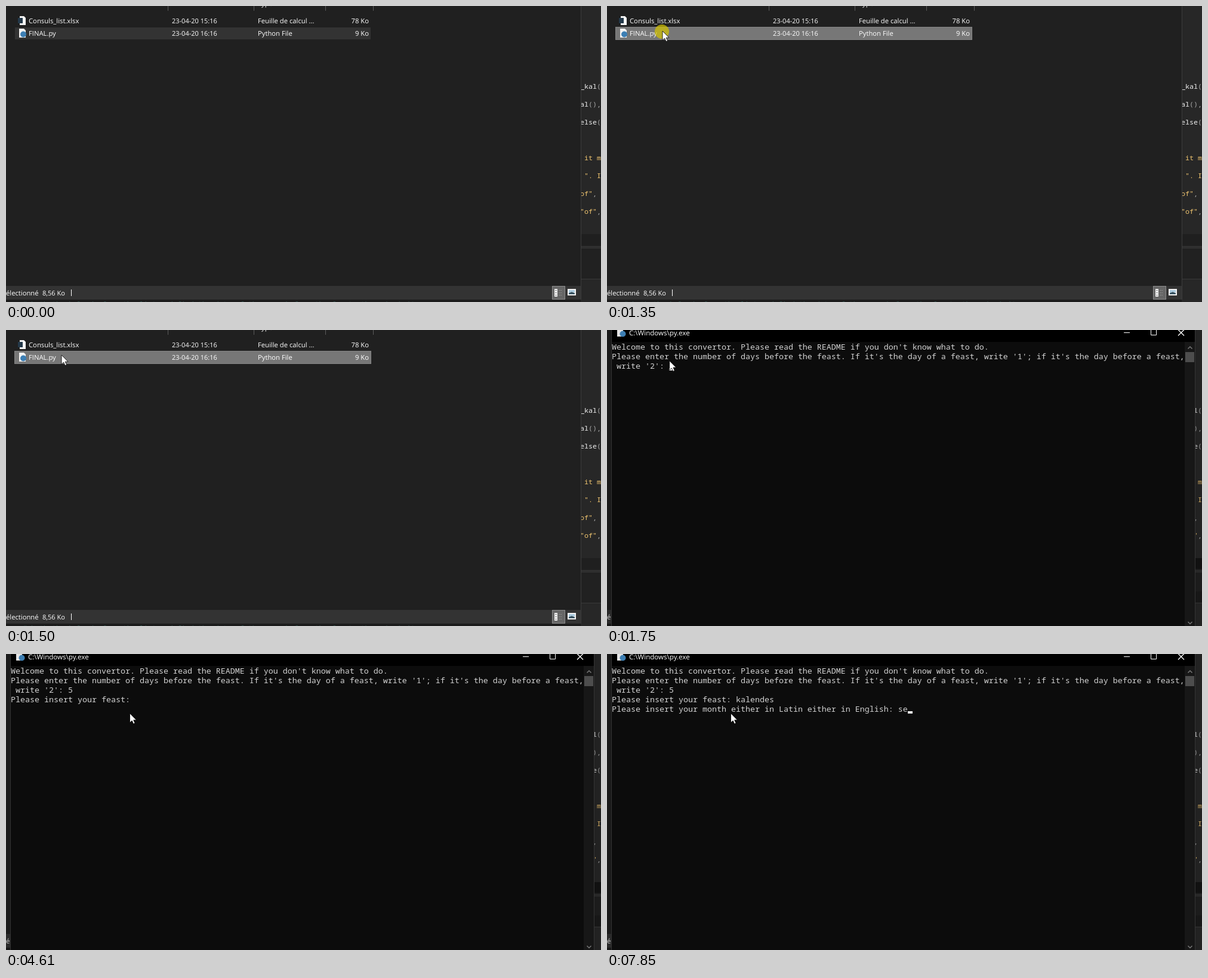
An HTML page that plays this animation: 997x497 px, repeating every 8000 ms.

```html
<!DOCTYPE html>
<html lang="en">
<head>
<meta charset="utf-8">
<title>Console date convertor</title>
<style>
html, body { margin: 0; width: 100%; height: 100%; overflow: hidden; background: #202020; }
svg { display: block; width: 997px; height: 497px; }
text { white-space: pre; }
.ui { font: 11.25px "Open Sans", "Noto Sans", sans-serif; fill: #fff; text-rendering: geometricPrecision; }
.title { font-size: 11.55px; }
.digits { font-size: 11px; }
.code { font: 11.667px "Noto Sans Mono", "DejaVu Sans Mono", monospace; fill: #f2f2f2; }
.code .dim { fill: #a8a8a8; }
.code .str { fill: #f0c570; }
.term { font: 13.3333px "Noto Sans Mono", "DejaVu Sans Mono", monospace; fill: #d2d2d2; }
.stroke { fill: none; stroke: #fff; }
</style>
</head>
<body>
<svg viewBox="0 0 997 497">
  <g id="editor">
    <rect width="997" height="497" fill="#272727"/>
    <rect x="963" y="383" width="34" height="20" fill="#1f1f1f"/>
    <rect x="963" y="403" width="34" height="4" fill="#363636"/>
    <rect x="963" y="404.5" width="34" height="1" fill="#222"/>
    <rect x="963" y="407" width="34" height="51" fill="#212121"/>
    <rect x="963" y="458" width="34" height="1" fill="#3a3a3a"/>
    <rect y="493" width="963" height="4" fill="#1c1c1c"/>
    <g class="code">
      <text x="962" y="139">_kal<tspan class="dim">(</tspan></text>
      <text x="962" y="169">al<tspan class="dim">(),</tspan></text>
      <text x="962" y="199">else<tspan class="dim">(</tspan></text>
      <text x="962" y="259" class="str"> it m</text>
      <text x="962" y="289" class="str"> ". I</text>
      <text x="962" y="319"><tspan class="str">of"</tspan><tspan class="dim">,</tspan></text>
      <text x="962" y="349"><tspan class="str">"of"</tspan><tspan class="dim">,</tspan></text>
      <text x="28" y="504" style="fill:#2b4f4a"># both the kalends from the list and find the date of the year before the feast, then check it</text>
    </g>
  </g>

  <g id="explorer">
    <rect width="963" height="493" fill="#202020"/>
    <rect x="963" width="1" height="493" fill="#3c3c3c"/>
    <path d="M271.5 0V8M415.5 0V8M535.5 0V8M615.5 0V8" stroke="#5c5c5c"/>
    <rect id="row" x="15" y="36" width="596" height="20" fill="#333"/>
    <g class="ui">
      <text x="422" y="0">Type</text>
      <text x="38" y="29">Consuls_list.xlsx</text>
      <text x="278" y="29" class="digits">23-04-20 15:16</text>
      <text x="422" y="29">Feuille de calcul ...</text>
      <text x="608" y="29" text-anchor="end">78 Ko</text>
      <text x="38" y="50">FINAL.py</text>
      <text x="278" y="50" class="digits">23-04-20 16:16</text>
      <text x="422" y="50">Python File</text>
      <text x="608" y="50" text-anchor="end">9 Ko</text>
    </g>
    <path d="M23 17H30L33 20V32H23Z" fill="#f4f4f4"/>
    <rect x="20" y="20" width="8" height="9" fill="#24394a"/>
    <path d="M22 38H30L33 41V53H22Z" fill="#f4f4f4"/>
    <circle cx="29" cy="47.5" r="5" fill="#3d7fb4"/>
    <rect y="470" width="963" height="23" fill="#333"/>
    <text class="ui" x="0" y="486">électionné</text>
    <text class="ui digits" x="61" y="486">8,56 Ko</text>
    <rect x="109" y="476" width="1" height="11" fill="#fff"/>
    <rect x="915.5" y="470.5" width="21" height="22" fill="#666" stroke="#8c8c8c"/>
    <rect x="919" y="475" width="5" height="13" fill="#f2f2f2"/>
    <path d="M920.5 477.5H922.5M920.5 481.5H922.5M920.5 485.5H922.5" stroke="#555"/>
    <path d="M926 477.5H931M926 481.5H931M926 485.5H931" stroke="#8c8c8c" stroke-dasharray="2 1"/>
    <rect x="941" y="475" width="14" height="11" fill="#f2f2f2"/>
    <path d="M943 477H953V481L948 480L943 482Z" fill="#a9c9de"/>
    <path d="M943 482L948 480L953 482V484H943Z" fill="#35505f"/>
  </g>

  <g id="console">
    <rect width="7" height="497" fill="#000" opacity=".18"/>
    <rect x="986" width="11" height="497" fill="#000" opacity=".14"/>
    <rect x="986" y="383" width="11" height="18" fill="#111"/>
    <rect x="986" y="439" width="11" height="18" fill="#171717"/>
    <rect x="7" width="979" height="497" fill="#343434"/>
    <rect x="8" width="977" height="20" fill="#000"/>
    <rect x="8" y="20" width="960" height="477" fill="#0c0c0c"/>
    <rect x="968" y="20" width="17" height="477" fill="#171717"/>
    <rect x="969" y="37" width="15" height="17" fill="#4d4d4d"/>
    <path d="M973.5 31.5L977 28L980.5 31.5M973.5 490L977 493.5L980.5 490" fill="none" stroke="#777" stroke-width="1.5"/>
    <path d="M17 0H27V11H17Z" fill="#e4e4e4"/>
    <circle cx="26.5" cy="6.5" r="5" fill="#3d7fb4"/>
    <text class="ui title" x="37" y="9">C:\Windows\py.exe</text>
    <path class="stroke" d="M866 4.5H876M911.5 -.5H920.5V8.5H911.5Z"/>
    <path class="stroke" d="M957 -.5L967 9.5M967 -.5L957 9.5" stroke-width="1.3"/>
    <g class="term" id="lines"></g>
    <rect id="caret" width="8" height="4" fill="#f2f2f2"/>
  </g>

  <circle id="click" cx="92" cy="43" r="12" fill="#d6c400" opacity=".7"/>
  <path id="pointer" d="M0 0V15.5L3.6 12.2L6 17.6L8.6 16.5L6.2 11.2H11Z" fill="#fff" stroke="#000" stroke-width=".8"/>
</svg>
<script>
const LOOP = 8000;
const $ = id => document.getElementById(id);
const show = (id, on) => $(id).style.display = on ? '' : 'none';

const prompts = [
  "Welcome to this convertor. Please read the README if you don't know what to do.",
  "Please enter the number of days before the feast. If it's the day of a feast, write '1'; if it's the day before a feast,",
  " write '2': ",
  "Please insert your feast: ",
  "Please insert your month either in Latin either in English: "
];
const answers = ['', '', '5', 'kalendes', 'se'];

// time, active line, characters typed, caret visible
const steps = [
  [0, 2, 0, 1], [2510, 2, 0, 0], [3040, 2, 0, 1], [3500, 2, 1, 1], [3580, 2, 1, 0],
  [4060, 3, 0, 1], [4610, 3, 0, 0], [5160, 3, 0, 1], [5240, 3, 1, 1], [5320, 3, 2, 1],
  [5470, 3, 3, 1], [5640, 3, 4, 1], [5720, 3, 5, 1], [5870, 3, 6, 1], [5950, 3, 7, 1],
  [6030, 3, 8, 1], [6180, 4, 0, 0], [6260, 4, 0, 1], [7290, 4, 0, 0],
  [7690, 4, 1, 1], [7770, 4, 2, 0], [7850, 4, 2, 1]
];

const overFile = [93, 42], overPrompt = [116.5, 61.7];

// start, end, number of steps, from, to
const moves = [
  [70, 860, 11, [864, 482], [86, 45]],
  [930, 930, 1, [86, 45], overFile],
  [1660, 1910, 4, overFile, overPrompt],
  [2200, 2510, 5, overPrompt, [207.5, 99.7]]
];

const lines = prompts.map((_, i) => {
  const line = document.createElementNS('http://www.w3.org/2000/svg', 'text');
  line.setAttribute('x', 8);
  line.setAttribute('y', 33 + 16 * i);
  return $('lines').appendChild(line);
});

function pointerAt(t) {
  if (t >= 1420 && t < 1500) return overPrompt;
  const [start, end, count, from, to] = moves.filter(m => m[0] <= t).pop();
  const gap = (end - start) / Math.max(1, count - 1);
  const n = gap ? Math.min(count - 1, Math.floor((t - start) / gap + 0.02)) : 0;
  const first = start === 70 ? 0 : 1;
  const p = (n + first) / (count - 1 + first);
  const eased = p * p * (3 - 2 * p);
  return from.map((v, i) => v + (to[i] - v) * eased);
}

function drawPointer(t) {
  show('pointer', t >= 70);
  if (t < 70) return false;
  const [x, y] = pointerAt(t);
  $('pointer').setAttribute('transform', `translate(${x} ${y})`);
  return x < 612 && y >= 35 && y < 57;
}

function drawRow(hover) {
  const box = hover ? [14.5, 35.5, 597, 21] : [15, 36, 596, 20];
  ['x', 'y', 'width', 'height'].forEach((name, i) => $('row').setAttribute(name, box[i]));
  $('row').setAttribute('fill', hover ? '#777' : '#333');
  $('row').setAttribute('stroke', hover ? '#858585' : 'none');
}

function drawConsole(t) {
  const [, active, typed, caret] = steps.filter(s => s[0] <= t).pop();
  lines.forEach((line, i) => {
    const answer = i < active ? answers[i] : answers[i].slice(0, typed);
    const text = i > active ? '' : prompts[i] + answer;
    if (line.textContent !== text) line.textContent = text;
  });
  show('caret', caret);
  $('caret').setAttribute('x', 8 + 8 * (prompts[active].length + typed));
  $('caret').setAttribute('y', 32 + 16 * active);
}

function draw(t) {
  drawRow(drawPointer(t));
  show('console', (t >= 1420 && t < 1500) || t >= 1660);
  show('click', (t >= 1180 && t < 1260) || (t >= 1350 && t < 1420));
  drawConsole(t);
}

const begin = performance.now();
function frame() {
  draw((performance.now() - begin) % LOOP);
  requestAnimationFrame(frame);
}
frame();
</script>
</body>
</html>
```
